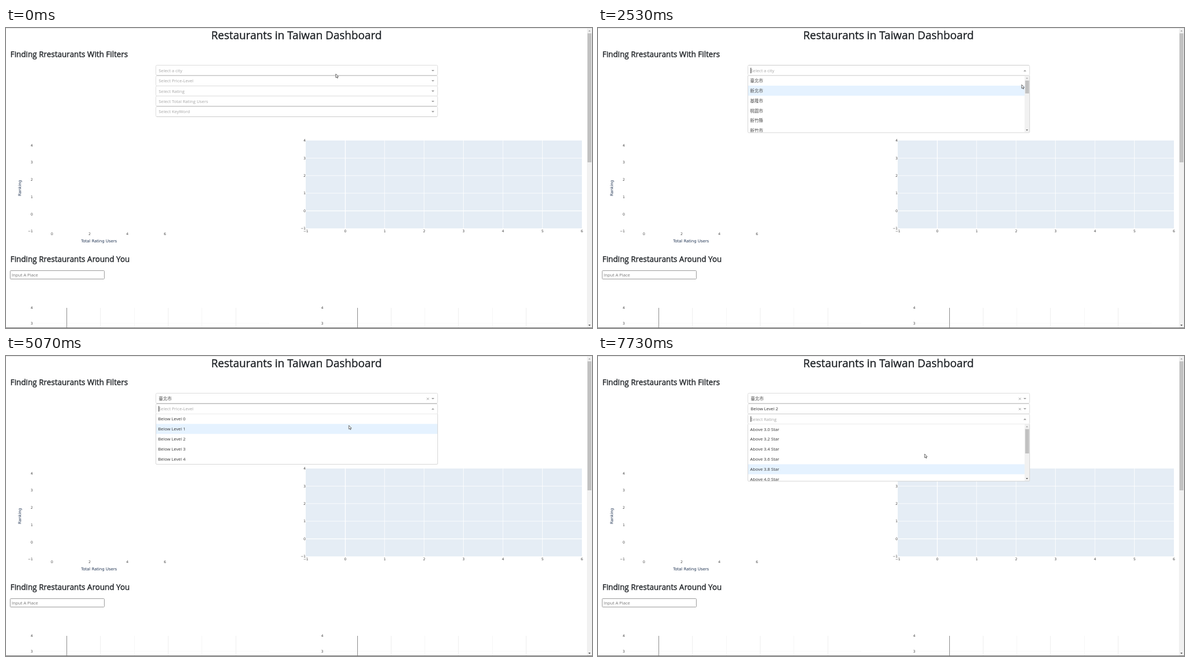
These frames come from a looping animation (1046 px wide and 536 px high, 8 s). An HTML page:

```html
<!DOCTYPE html>
<html lang="en">
<head>
<meta charset="utf-8">
<title>Dashboard</title>
<style>
html, body { margin: 0; width: 100%; height: 100%; overflow: hidden; background: #fff; }
svg { display: block; }
text { font-family: "Open Sans", "Noto Sans CJK TC", "Noto Sans CJK", sans-serif; font-size: 7.75px; fill: #333; white-space: pre; }
.head { font-size: 13.9px; fill: #212529; stroke: #212529; stroke-width: .4px; }
.title { font-size: 19.55px; }
.tick { font: 6.2px "DejaVu Sans", sans-serif; fill: #444; }
.axis { font: 7.1px "DejaVu Sans", sans-serif; fill: #1f3352; }
.hint { fill: #a6a6a6; }
.cjk { font-weight: 300; fill: #4a4a4a; }
</style>
</head>
<body>
<svg id="stage" width="1046" height="536" viewBox="0 0 1046 536"><g id="page"></g><g id="ui"></g></svg>
<script>
const $ = id => document.getElementById(id);
const rect = (x, y, w, h, fill, more = '') => `<rect x="${x}" y="${y}" width="${w}" height="${h}" fill="${fill}" ${more}/>`;
const text = (x, y, s, cls = '', more = '') => `<text x="${x}" y="${y}" class="${cls}" ${more}>${s}</text>`;
const path = (d, fill, more = '') => `<path d="${d}" fill="${fill}" ${more}/>`;
const tri = (x, y, w, h, fill) => path(`M${x - w} ${y - h}h${2 * w}L${x} ${y + h}z`, fill);
const END = 'text-anchor="end"', MID = 'text-anchor="middle"';
const label = n => n < 0 ? '−' + -n : n;

function drawPage() {
  let s = text(518.5, 20.2, 'Restaurants in Taiwan Dashboard', 'head title', MID);
  s += text(7.8, 51.5, 'Finding Rrestaurants With Filters', 'head');
  s += text(7.8, 418.2, 'Finding Rrestaurants Around You', 'head');
  s += rect(7.5, 433.5, 168, 15, '#fff', 'stroke="#999" rx="1"');
  s += text(10, 444.3, 'Input A Place', '', 'style="fill:#757575"');

  // empty scatter plot
  for (let i = -1; i < 5; i++) s += text(48, 334.5 - 30.7 * i, label(i), 'tick', END);
  for (let i = 0; i < 7; i += 2) s += text(82 + 33.6 * i, 369.7, i, 'tick', MID);
  s += text(166, 383.4, 'Total Rating Users', 'axis', MID);
  s += text(0, 0, 'Ranking', 'axis', MID + ' transform="translate(26.8 286) rotate(-90)"');

  // empty map plot
  s += rect(535, 201, 493, 157, '#e5edf5');
  for (let i = 0; i < 6; i++) s += rect(605 + 70.4 * i, 201, i ? .8 : 1.3, 157, '#fff');
  for (let i = 0; i < 4; i++) s += rect(535, 326 - 31.3 * i, 493, i ? .8 : 1.3, '#fff');
  for (let i = -1; i < 5; i++) s += text(535, 328.8 - 31.4 * i, label(i), 'tick', END);
  for (let i = -1; i < 7; i++) s += text(605.6 + 70.4 * i, 365, label(i), 'tick', MID);

  // tops of the two lower plots
  for (const x of [0, 518.5]) {
    s += rect(x + 48, 527, 422, 1, '#f8f8f8');
    for (let i = 0; i < 6; i++)
      s += rect(Math.floor(x + 108.5 + 60.3 * i), 500, 1, 36, i ? i % 2 ? '#eee' : '#f6f6f6' : '#888');
    s += text(x + 48, 502.2, 4, 'tick', END) + text(x + 48, 529.8, 3, 'tick', END);
  }

  // window edges and scrollbar
  s += rect(1037, 0, 9, 536, '#f1f1f1') + rect(1038, 9.5, 7, 230.5, '#c1c1c1');
  s += tri(1041.5, 5, 2, -1.2, '#a3a3a3') + tri(1041.5, 531.2, 2, 1.2, '#505050');
  s += rect(0, 0, 1046, 1, '#e4e4e4') + rect(0, 535, 1046, 1, '#777');
  return s;
}

// open..close: time the menu shows; focus: [time, highlighted row]
const range = (n, f) => Array.from({ length: n }, (_, i) => f(i));
const fields = [
  { hint: 'Select a city', open: 1300, close: 3170, blur: 3970, thumb: 23, picked: 0, cls: 'cjk',
    rows: ['臺北市', '新北市', '基隆市', '桃園市', '新竹縣', '新竹市'], focus: [[0, 0], [2400, 1], [2670, 0]] },
  { hint: 'Select Price-Level', open: 3970, close: 5900, blur: 6500, picked: 2,
    rows: range(5, i => 'Below Level ' + i), focus: [[0, 0], [4500, 1], [5500, 2]] },
  { hint: 'Select Rating', open: 6500, close: 9000, blur: 9000, thumb: 43.5, picked: 0,
    rows: range(6, i => `Above ${(3 + i / 5).toFixed(1)} Star`), focus: [[0, 0], [6900, 1], [7100, 2], [7300, 3], [7700, 4]] },
  { hint: 'Select Total Rating Users' },
  { hint: 'Select KeyWord' }
];
const ROW = 17.9;
const fieldTop = i => 66.7 + 18.35 * i;

function drawField(f, i, t) {
  const top = fieldTop(i), y = Math.floor(top) + .5, mid = top + 9.3;
  const opened = t >= f.open && t < f.close, done = t >= f.close;
  const focused = done && t < f.blur;
  let s = '';
  if (focused) s += rect(267, y - .5, 504, 19, 'none', 'rx="2.5" stroke="#007eff" stroke-opacity=".15" stroke-width="2"');
  s += rect(267.5, y, 503, 18, '#fff', `rx="2" stroke="${focused ? '#5aa7ee' : '#dcdcdc'}"`);
  if (!focused) s += rect(269, y + (opened ? -.5 : 17.5), 500, 1, '#cbcbcb');
  s += text(272.6, mid + 2.8, done ? f.rows[f.picked] : f.hint, done ? f.cls : 'hint');
  if (opened && Math.floor((t - f.open) / 533) % 2 == 0) s += rect(272.4, mid - 5, 1, 10, '#222');
  const hover = i == 0 && t >= 900 && t < f.open;
  s += tri(762, mid + .2, 2.6, opened ? -1.3 : 1.3, hover ? '#555' : '#999');
  if (done) {
    const k = Math.min(1, .15 + (t - f.close) / 200), r = 1.9 * k;
    s += path(`M${753 - r} ${mid + .5 - r}l${2 * r} ${2 * r}m0 ${-2 * r}l${-2 * r} ${2 * r}`, 'none', `stroke="#999" stroke-width=".9" opacity="${k}"`);
  }
  return s;
}

function drawMenu(f, i, t) {
  const top = fieldTop(i) + 18.4, h = Math.min(101.4, f.rows.length * ROW);
  const row = f.focus.filter(k => t >= k[0]).pop()[1];
  let s = rect(0, 0, 503, h, '#fff') + rect(0, row * ROW, 503, ROW, '#e5f2ff');
  f.rows.forEach((r, n) => s += text(4.1, n * ROW + 11.8, r, f.cls));
  if (f.thumb) {
    s += rect(494, 0, 9, h, '#f1f1f1') + rect(495, 8.8, 7, f.thumb, '#c1c1c1');
    s += tri(498.2, 4.4, 1.9, -1.1, '#a3a3a3') + tri(498.2, h - 4, 1.9, 1.1, '#505050');
  }
  s = `<svg x="267.5" y="${top}" width="503" height="${h}">${s}</svg>`;
  return s + path(`M267.5 ${top}v${h - 1}q0 1.5 1.5 1.5h500q1.5 0 1.5 -1.5v${1 - h}`, 'none', 'stroke="#d6d6d6"')
    + rect(268, Math.floor(top), 502, 1, '#ebebeb');
}

// pointer stops: time, x, y
const stops = [
  [0, 588.7, 82], [30, 588.7, 82], [400, 690, 86.5], [930, 815.8, 78.5], [1670, 815.8, 78.5],
  [2530, 756.3, 101.3], [2730, 752, 93], [3150, 752, 93], [3930, 629.3, 97], [4200, 629.3, 97],
  [4670, 612, 124], [5330, 612, 124], [5600, 608.6, 138.8], [5930, 608.6, 138.8], [6500, 607.5, 113],
  [6750, 607.5, 113], [6930, 606.7, 139.5], [7400, 590, 165], [7530, 590, 165], [7730, 583, 175], [8000, 583, 175]
];

function drawPointer(t) {
  const n = stops.findIndex(k => k[0] > t), [t0, x0, y0] = stops[n - 1], [t1, x1, y1] = stops[n];
  const p = (t - t0) / (t1 - t0), e = p * p * (3 - 2 * p);
  const x = x0 + (x1 - x0) * e, y = y0 + (y1 - y0) * e;
  const line = 'stroke="#333" stroke-width=".75" stroke-linejoin="round"';
  let s;
  if (t >= 900 && t < 1800)
    s = path('M-.9 5V.6Q0 -.5 .9 .6V3.6L3.8 4.3Q4.4 4.6 4.3 5.4L3.5 9.2H-.4L-2.8 6Q-2.8 4.9 -1.9 5.2L-.9 6z', '#fff', line);
  else if (t >= 3970 && t < 4400 || t >= 6500 && t < 6850)
    s = path('M-1.5 -3.7H1.5M0 -3.7V3.7M-1.5 3.7H1.5', 'none', 'stroke="#222" stroke-width=".9"');
  else
    s = path('M0 0V6.7L1.5 5.4L2.6 7.7L3.7 7.2L2.7 5H4.7z', '#fff', line);
  return `<g transform="translate(${x} ${y})">${s}</g>`;
}

function draw(t) {
  let s = '';
  fields.forEach((f, i) => s += drawField(f, i, t));
  fields.forEach((f, i) => { if (t >= f.open && t < f.close) s += drawMenu(f, i, t); });
  $('ui').innerHTML = s + drawPointer(t);
}

const STEP = 8000 / 120;
let last = -1;
function tick() {
  const n = Math.floor((performance.now() % 8000 + 4) / STEP) % 120;
  if (n != last) draw((last = n) * STEP);
  requestAnimationFrame(tick);
}
$('page').innerHTML = drawPage();
tick();
</script>
</body>
</html>
```
